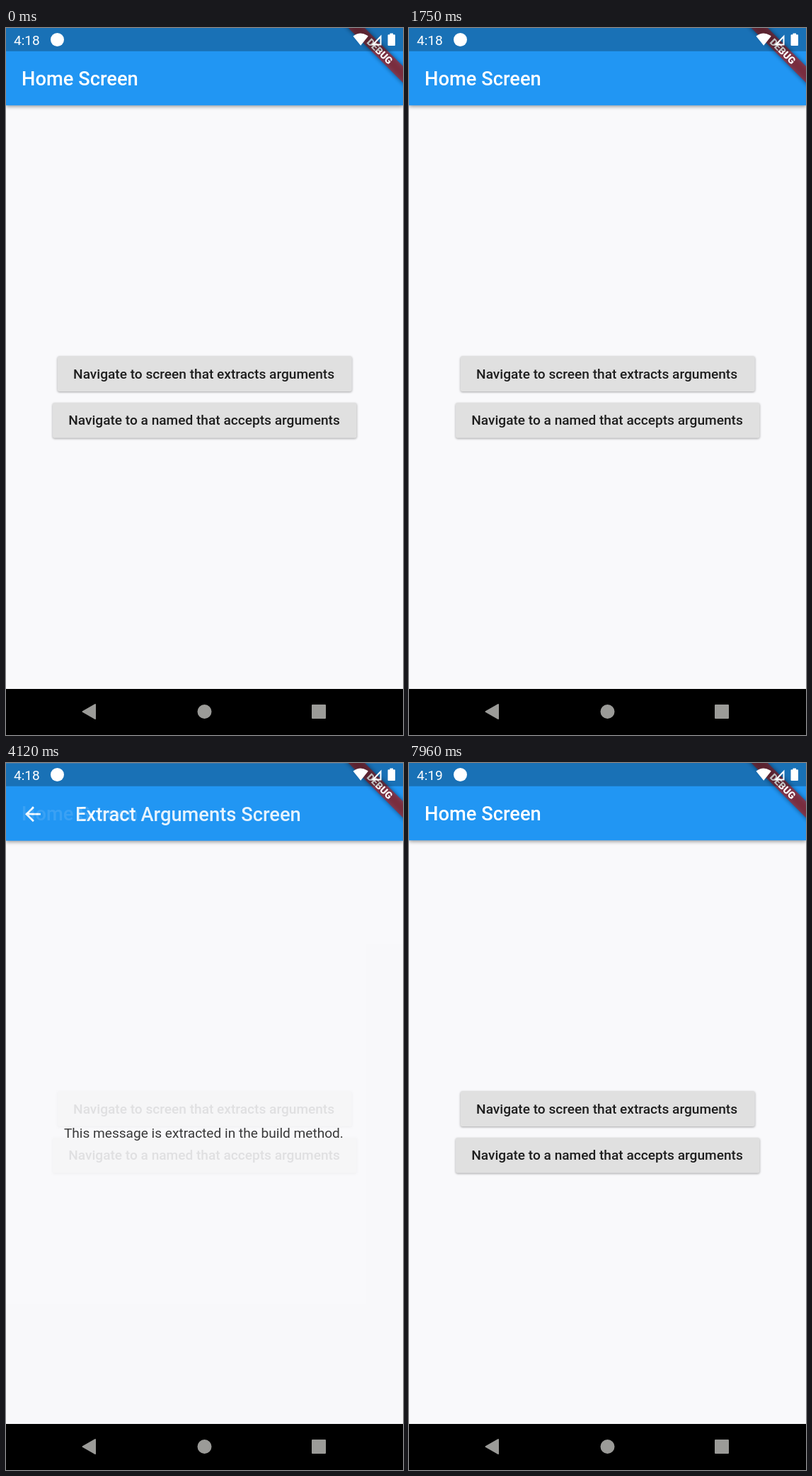
An HTML page for the animation above (8000 ms loop, 561 by 998 pixels).

```html
<!DOCTYPE html>
<html lang="en">
<head>
<meta charset="utf-8">
<title>Screen navigation</title>
<style>
  html, body { margin: 0; width: 100%; height: 100%; overflow: hidden; background: #000; }
  svg { display: block; width: 100%; height: 100%; }
  text { font-family: Roboto, sans-serif; font-size: 19.1px; fill: #fff; }
  .title { font-size: 27.3px; font-weight: 500; }
  .label { font-weight: 500; fill: #000; fill-opacity: .87; text-anchor: middle; }
  .msg { fill: #000; fill-opacity: .87; text-anchor: middle; }
  .body { fill: #f9f9fb; }
  .bar { fill: #2196f3; filter: drop-shadow(0 2px 2.5px rgba(0, 0, 0, .36)); }
  .btn { fill: #e0e0e0; filter: drop-shadow(0 1.5px 1.5px rgba(0, 0, 0, .34)); }
  .nav { fill: #9b9b98; stroke: #9b9b98; stroke-width: 2; stroke-linejoin: round; }
</style>
</head>
<body>
<svg viewBox="0 0 561 998">
  <defs>
    <clipPath id="btnClip"><rect x="72.8" y="463.3" width="416" height="49.7" rx="2.7"/></clipPath>
    <clipPath id="barClip"><rect width="561" height="109.2"/></clipPath>
    <filter id="soft" x="-20%" y="-80%" width="140%" height="260%"><feGaussianBlur stdDeviation="3"/></filter>
  </defs>

  <g id="home">
    <rect class="body" width="561" height="933"/>
    <rect class="bar" width="561" height="109.2"/>
    <text class="title" x="22" y="81">Home Screen</text>
    <rect id="btn" class="btn" x="72.8" y="463.3" width="416" height="49.7" rx="2.7"/>
    <g clip-path="url(#btnClip)">
      <rect id="btnGlow" x="72" y="463" width="418" height="51"/>
      <circle id="btnSplash" cx="160" cy="468"/>
    </g>
    <text class="label" x="279.6" y="495">Navigate to screen that extracts arguments</text>
    <rect class="btn" x="66" y="529" width="429.5" height="49.7" rx="2.7"/>
    <text class="label" x="280" y="560">Navigate to a named that accepts arguments</text>
  </g>

  <g id="page">
    <rect class="body" width="561" height="933"/>
    <rect class="bar" width="561" height="109.2"/>
    <g clip-path="url(#barClip)" fill="#ccc">
      <circle id="backGlow" cx="37.5" cy="72.5" r="47.8"/>
      <circle id="backSplash" cx="37.5" cy="72.5"/>
    </g>
    <path fill="#fff" transform="translate(21.6 55.2) scale(1.365)"
      d="M20 11H7.83l5.59-5.59L12 4l-8 8 8 8 1.41-1.41L7.83 13H20z"/>
    <text class="title" x="98" y="81">Extract Arguments Screen</text>
    <text class="msg" x="279.4" y="528">This message is extracted in the build method.</text>
  </g>

  <g transform="translate(561 0) rotate(45)">
    <rect x="-70" y="38.2" width="140" height="16.4" fill-opacity=".5" filter="url(#soft)"/>
    <rect x="-70" y="38.2" width="140" height="16.4" fill="#b71c1c" fill-opacity=".627"/>
    <text y="51.4" text-anchor="middle" style="font-size:13.9px;font-weight:900">DEBUG</text>
  </g>

  <rect width="561" height="32.8" fill-opacity=".25"/>
  <text id="clock" x="11" y="23.8">4:18</text>
  <g fill="#fff">
    <circle cx="72.5" cy="16.5" r="9.5"/>
    <path d="M490.5 11.5Q501 3.5 511.8 11.5L501.2 24.8Z"/>
    <path d="M516 24.5L530.5 9.5V24.5ZM521 22.5H528.5V14.5Z" fill-rule="evenodd"/>
    <path d="M542.5 9.2V7.5H547V9.2H549Q550 9.2 550 10.2V24Q550 25 549 25H540.5Q539.5 25 539.5 24V10.2Q539.5 9.2 540.5 9.2Z"/>
  </g>

  <rect y="933" width="561" height="65"/>
  <g class="nav">
    <path d="M108.5 965L126 955V975Z"/>
    <circle cx="280.5" cy="965" r="9"/>
    <rect x="433" y="956" width="18" height="18"/>
  </g>
</svg>

<script>
const LOOP = 8000;
const CLOCK_TICK = 5500;
const PUSH = 3842, POP = 6570, SLIDE = 300, RISE = 233;
const TAP = { down: 3140, up: 3800, reach: 331, confirm: 243 };
const BACK = { down: 6430, up: 6560, reach: 47.8, confirm: 35 };

const $ = id => document.getElementById(id);
const clamp = v => Math.min(1, Math.max(0, v));
const ramp = (t, start, length) => clamp((t - start) / length);

// Both curves used here have y control points 0 and 1.
function ease(x, x1, x2) {
  let lo = 0, hi = 1;
  for (let i = 0; i < 24; i++) {
    const s = (lo + hi) / 2, r = 1 - s;
    if (3 * r * r * s * x1 + 3 * r * s * s * x2 + s * s * s < x) lo = s; else hi = s;
  }
  return lo * lo * (3 - 2 * lo);
}
const fastOutSlowIn = x => ease(x, .4, .2);
const easeIn = x => ease(x, .42, 1);

// Slow growth while held, quick growth and fade after release.
function ink(t, p) {
  const held = clamp((Math.min(t, p.up) - p.down) / 1000);
  const grown = clamp(held + (t > p.up ? (t - p.up) / p.confirm : 0));
  const fade = 1 - ramp(t, p.up, 200);
  return {
    radius: p.reach * grown,
    splash: t < p.down ? 0 : fade,
    glow: Math.min(ramp(t, p.down, 200), fade)
  };
}

function draw(t) {
  const tap = ink(t, TAP);
  $('btnGlow').setAttribute('fill-opacity', .16 * tap.glow);
  $('btnSplash').setAttribute('r', tap.radius);
  $('btnSplash').setAttribute('fill-opacity', .12 * tap.splash);
  const lift = Math.sqrt(tap.glow);
  $('btn').style.filter =
    `drop-shadow(0 ${1.5 + 4 * lift}px ${1.5 + 3.5 * lift}px rgba(0,0,0,.34))`;

  const back = ink(t, BACK);
  $('backGlow').setAttribute('fill-opacity', .17 * back.glow);
  $('backSplash').setAttribute('r', back.radius);
  $('backSplash').setAttribute('fill-opacity', .17 * back.splash);

  const shown = ramp(t, PUSH, SLIDE) - ramp(t, POP, SLIDE);
  const page = $('page');
  page.style.display = shown > 0 ? '' : 'none';
  page.setAttribute('opacity', easeIn(shown));
  page.setAttribute('transform', `translate(0 ${RISE * (1 - fastOutSlowIn(shown))})`);

  $('clock').textContent = t < CLOCK_TICK ? '4:18' : '4:19';
}

function tick() {
  draw(performance.now() % LOOP);
  requestAnimationFrame(tick);
}
tick();
</script>
</body>
</html>
```
